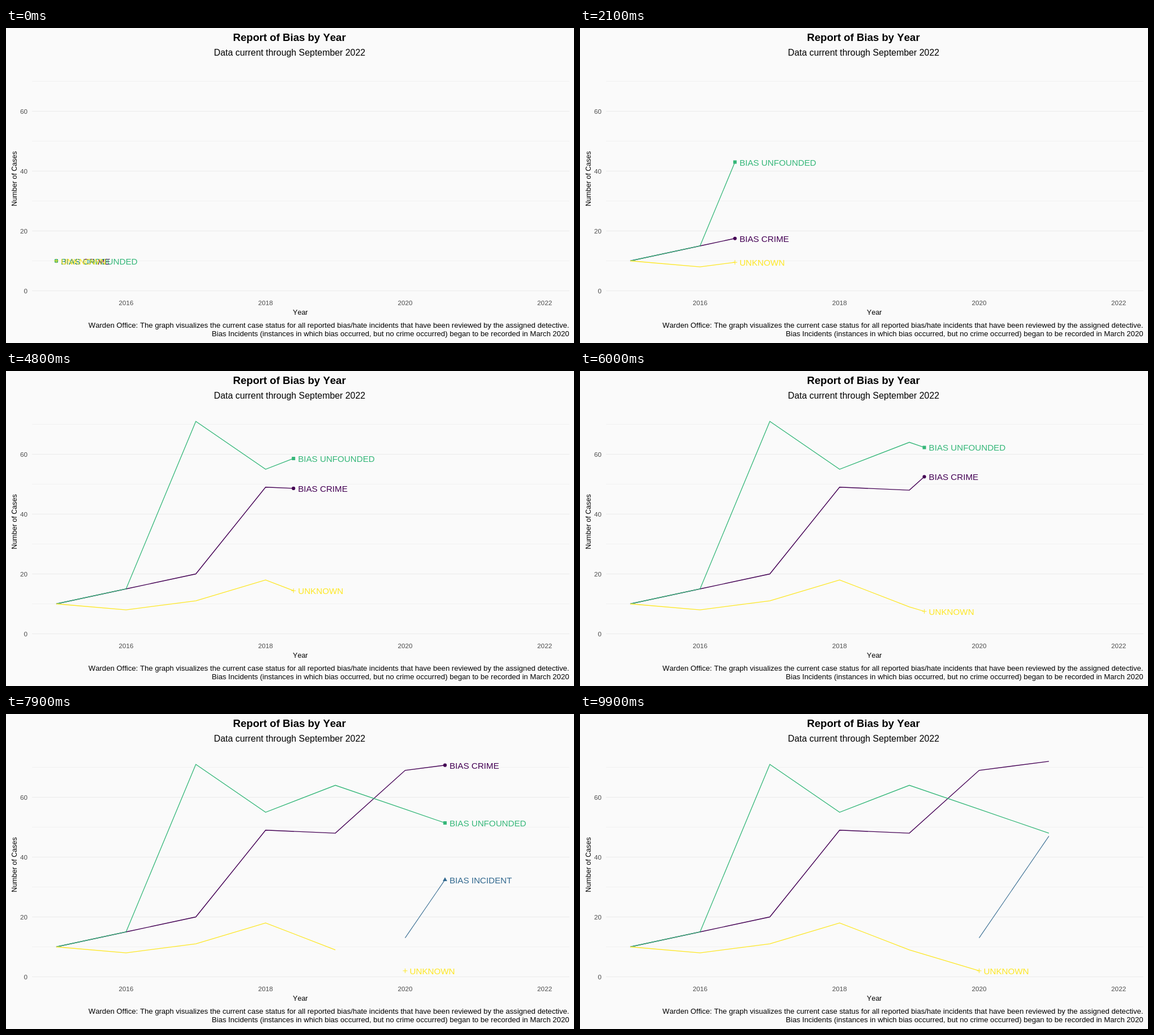
Animation of 1004 by 558 pixels, one loop 10 s. Source, as an HTML page:

```html
<!DOCTYPE html>
<html lang="en">
<head>
<meta charset="utf-8">
<title>Report of Bias by Year</title>
<style>
  html, body { margin: 0; width: 100%; height: 100%; overflow: hidden; background: #fafafa; }
  svg { display: block; font-family: "Liberation Sans", Arial, sans-serif; font-kerning: none; }
  .middle { text-anchor: middle; }
  .end { text-anchor: end; }
  .title { font-size: 18.6px; font-weight: bold; }
  .subtitle { font-size: 15.9px; }
  .caption { font-size: 13.12px; }
  .axis { font-size: 12.5px; }
  .tick { font-size: 11.73px; fill: #4d4d4d; }
  .label { font-size: 15.17px; }
</style>
</head>
<body>
<svg id="chart" width="1004" height="558" viewBox="0 0 1004 558">
  <clipPath id="panel"><rect x="45.5" y="65" width="950.5" height="408"/></clipPath>
  <text class="title middle" x="501" y="23">Report of Bias by Year</text>
  <text class="subtitle middle" x="501.3" y="49">Data current through September 2022</text>
  <text class="axis middle" x="520.3" y="508">Year</text>
  <text class="axis middle" transform="translate(19 267) rotate(-90)">Number of Cases</text>
  <text class="caption end" x="995.5" y="531">Warden Office: The graph visualizes the current case status for all reported bias/hate incidents that have been reviewed by the assigned detective.</text>
  <text class="caption end" x="995.5" y="546">Bias Incidents (instances in which bias occurred, but no crime occurred) began to be recorded in March 2020</text>
  <g id="grid"></g>
  <g clip-path="url(#panel)">
    <g id="lines"></g>
    <g id="markers"></g>
    <g id="labels"></g>
  </g>
</svg>
<script>
const FRAME_MS = 100, FRAMES = 100, FIRST_YEAR = 2015, SPAN = 7;

// Each year is reached on a whole frame; motion between years is linear.
const keyFrames = Array.from({ length: SPAN + 1 }, (_, i) => Math.round(i * (FRAMES - 1) / SPAN));

const shapes = {
  circle: "M-3.1 0a3.1 3.1 0 1 0 6.2 0a3.1 3.1 0 1 0-6.2 0z",
  triangle: "M0-4.4L3.9 2.3H-3.9z",
  square: "M-3-3H3V3H-3z",
  plus: "M-4 0H4M0-4V4"
};

const series = [
  { name: "BIAS CRIME", color: "#440154", shape: "circle", start: 0, values: [10, 15, 20, 49, 48, 69, 72, 57], width: 1.4 },
  { name: "BIAS INCIDENT", color: "#31688e", shape: "triangle", start: 5, values: [13, 47, 72], width: 1.05 },
  { name: "BIAS UNFOUNDED", color: "#35b779", shape: "square", start: 0, values: [10, 15, 71, 55, 64, 56, 48, 13], width: 1.3 },
  { name: "UNKNOWN", color: "#fde725", shape: "plus", start: 0, values: [10, 8, 11, 18, 9, 2], width: 1.3 }
];

const xOf = year => 88.9 + 123.32 * year;
const yOf = cases => 465.5 - 5.3 * cases;

function add(parentId, tag, attributes, text = "") {
  const node = document.createElementNS("http://www.w3.org/2000/svg", tag);
  set(node, attributes);
  node.textContent = text;
  return document.getElementById(parentId).appendChild(node);
}

function set(node, attributes) {
  for (const key in attributes) node.setAttribute(key, attributes[key]);
}

for (let cases = 0; cases <= 70; cases += 10) {
  const major = cases % 20 === 0, y = yOf(cases);
  add("grid", "path", { d: `M46 ${y}H996`, stroke: "#ebebeb", "stroke-width": major ? 1.07 : 0.6 });
  if (major) add("grid", "text", { class: "tick end", x: 38, y: y + 4.5 }, cases);
}
for (let year = 2016; year <= 2022; year += 2) {
  add("grid", "text", { class: "tick middle", x: xOf(year - FIRST_YEAR), y: 491 }, year);
}

for (const s of series) {
  s.last = s.start + s.values.length - 1;
  s.line = add("lines", "polyline", { fill: "none", stroke: s.color, "stroke-width": s.width });
  s.marker = add("markers", "path", s.shape === "plus"
    ? { d: shapes.plus, stroke: s.color, "stroke-width": 1 }
    : { d: shapes[s.shape], fill: s.color });
  s.label = add("labels", "text", { class: "label", fill: s.color }, s.name);
}

function valueAt(s, year) {
  const i = Math.floor(year) - s.start, from = s.values[i];
  return from + ((s.values[i + 1] ?? from) - from) * (year % 1);
}

function yearAt(frame) {
  const i = keyFrames.findLastIndex(key => key <= frame);
  if (i === SPAN) return SPAN;
  return i + (frame - keyFrames[i]) / (keyFrames[i + 1] - keyFrames[i]);
}

function draw(frame) {
  const year = yearAt(frame), closing = year === SPAN;
  for (const s of series) {
    const finished = year >= s.last;
    const head = Math.min(year, s.last);
    const started = head >= s.start && year >= s.start;
    const visible = started && !(closing && s.last === SPAN);

    // A finished line loses its last stretch; the closing frame restores it
    // only for series that stop before the final year.
    const tail = !finished ? year : closing && s.last < SPAN ? s.last : s.last - 1;
    const points = [];
    for (let i = s.start; i <= tail; i++) points.push([xOf(i), yOf(s.values[i - s.start])]);
    if (started && tail % 1) points.push([xOf(tail), yOf(valueAt(s, tail))]);
    set(s.line, { points: points.join(" ") });

    const display = visible ? "inline" : "none";
    s.marker.style.display = s.label.style.display = display;
    if (!visible) continue;
    const x = xOf(head), y = yOf(valueAt(s, head));
    set(s.marker, { transform: `translate(${x} ${y})` });
    set(s.label, { x: x + 8, y: Math.round(y + 6) });
  }
}

function tick() {
  draw(Math.floor(performance.now() / FRAME_MS) % FRAMES);
  requestAnimationFrame(tick);
}
tick();
</script>
</body>
</html>
```
